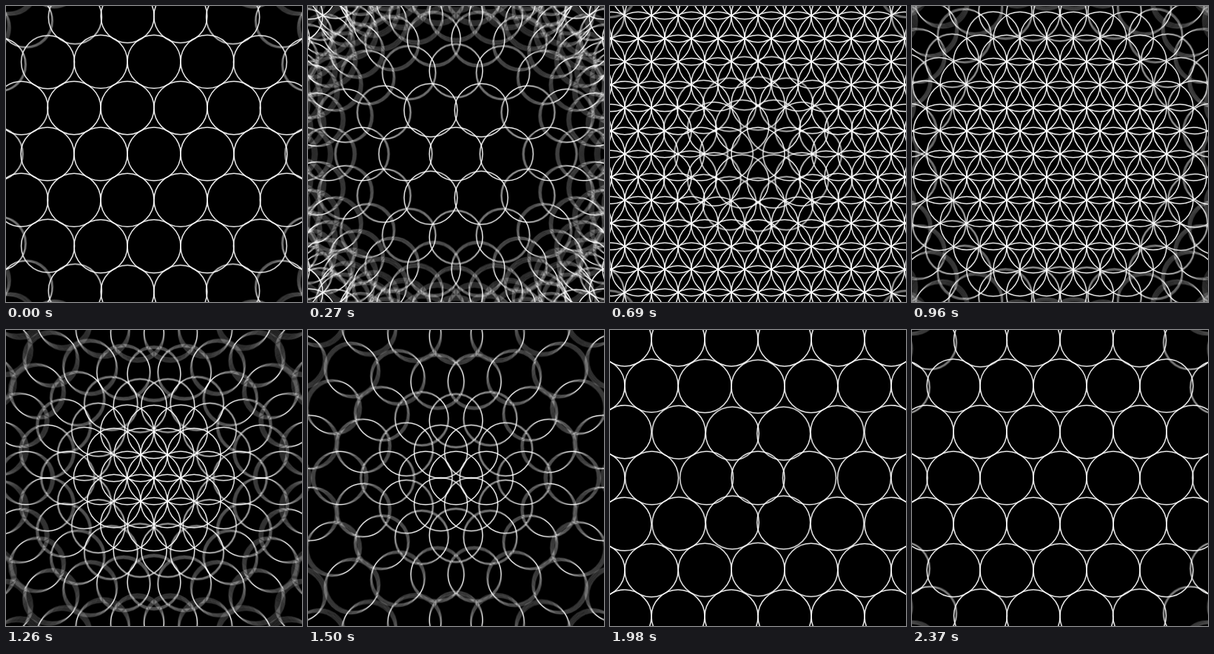
Animation of 400 by 400 pixels, one loop 2400 ms. Source, as an HTML page with a canvas:

```html
<!DOCTYPE html>
<html lang="en">
<head>
<meta charset="utf-8">
<title>Circle lattice</title>
<style>
  html, body { margin: 0; width: 100%; height: 100%; overflow: hidden; background: #000; }
  canvas { display: block; width: 400px; height: 400px; }
</style>
</head>
<body>
<canvas id="stage" width="400" height="400"></canvas>
<script>
const SIZE = 400, MID = SIZE / 2;
const RADIUS = 36, GAP = 72;
const LOOP = 2400, STEP = 30;
const SHUTTER = 28, SAMPLES = 8;   // motion blur
const MOVE = 800;                  // duration of one contraction or expansion
const LEAD = 219, LAG = 1.3;       // start time at the centre, ms earlier per pixel outwards
const REACH = 720;

const ctx = document.getElementById('stage').getContext('2d');
const buffer = document.createElement('canvas');
buffer.width = buffer.height = SIZE;
const pen = buffer.getContext('2d');
pen.lineWidth = 1.5;
pen.strokeStyle = 'rgba(255, 255, 255, 0.9)';

const lattice = [];
for (let row = -12; row <= 12; row++) {
  for (let col = -18; col <= 18; col++) {
    const x = (col + row / 2) * GAP;
    const y = row * GAP * Math.sqrt(3) / 2;
    const dist = Math.hypot(x, y);
    if (dist < REACH) lattice.push({ x, y, dist });
  }
}

const ease = p => {
  p = Math.min(1, Math.max(0, p));
  return p * p * (3 - 2 * p);
};

// Spacing factor: 1 -> 0.5 in the first half of the loop, back to 1 in the second.
function spread(dist, time) {
  const half = LOOP / 2;
  const u = (((time - LEAD + LAG * dist) % LOOP) + LOOP) % LOOP;
  return u < half ? 1 - ease(u / MOVE) / 2 : 0.5 + ease((u - half) / MOVE) / 2;
}

function drawSample(time) {
  pen.clearRect(0, 0, SIZE, SIZE);
  const limit = MID + RADIUS + 2;
  for (const c of lattice) {
    const k = spread(c.dist, time);
    const x = c.x * k, y = c.y * k;
    if (Math.abs(x) > limit || Math.abs(y) > limit) continue;
    pen.beginPath();
    pen.arc(MID + x, MID + y, RADIUS, 0, Math.PI * 2);
    pen.stroke();
  }
}

function draw(time) {
  ctx.globalCompositeOperation = 'source-over';
  ctx.globalAlpha = 1;
  ctx.fillStyle = '#000';
  ctx.fillRect(0, 0, SIZE, SIZE);
  ctx.globalCompositeOperation = 'lighter';
  ctx.globalAlpha = 1 / SAMPLES;
  for (let i = 0; i < SAMPLES; i++) {
    drawSample(time + SHUTTER * (i + 0.5) / SAMPLES);
    ctx.drawImage(buffer, 0, 0);
  }
}

let shown = -1;
function tick() {
  const step = Math.floor((performance.now() + 1) / STEP) % (LOOP / STEP);
  if (step !== shown) {
    shown = step;
    draw(step * STEP);
  }
  requestAnimationFrame(tick);
}
tick();
</script>
</body>
</html>
```
